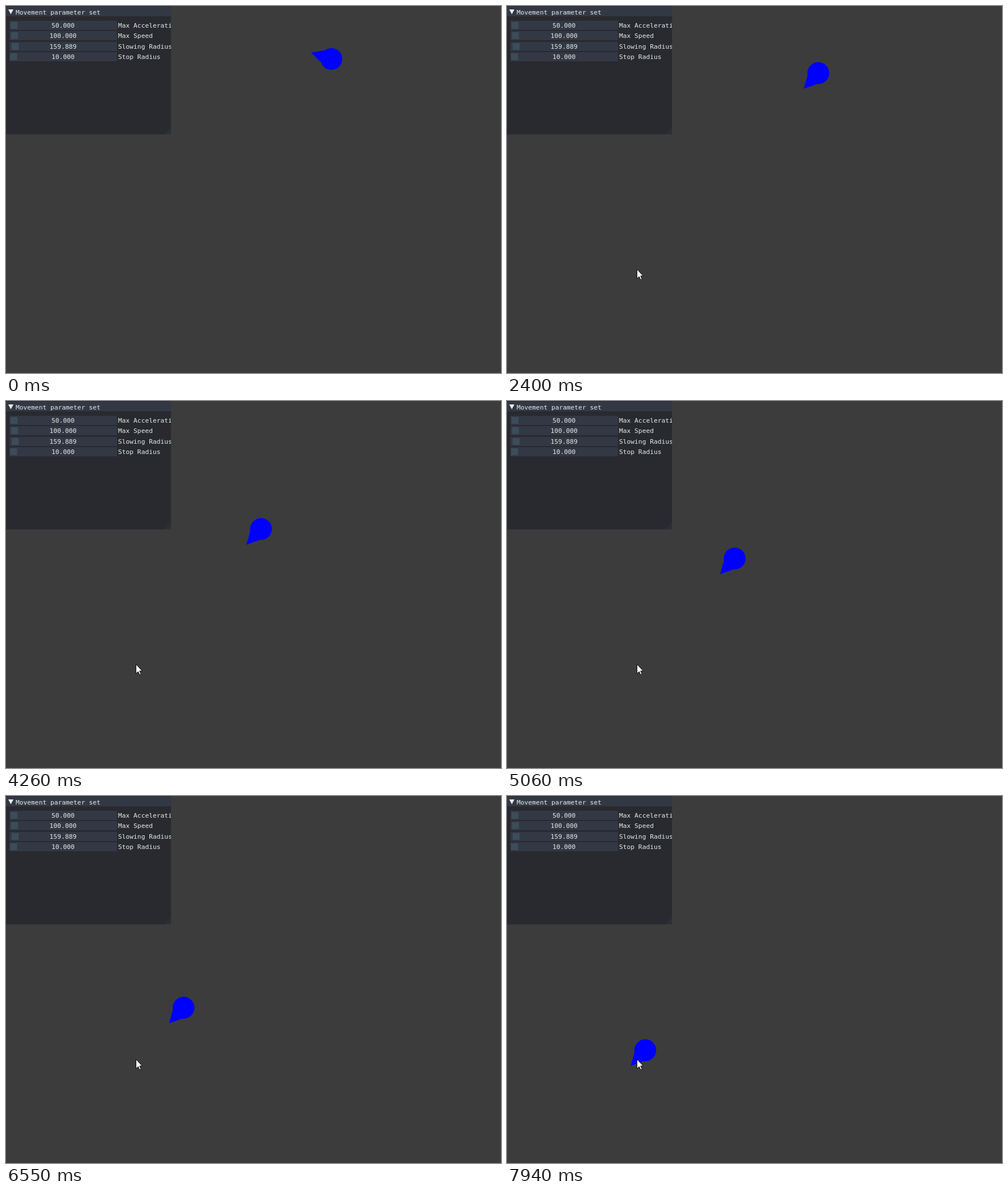
These frames come from a looping animation (870 by 644 pixels, 8 s). An HTML page:

```html
<!DOCTYPE html>
<html lang="en">
<head>
<meta charset="utf-8">
<title>Arrive steering</title>
<style>
  html, body { margin: 0; width: 100%; height: 100%; overflow: hidden; background: #3c3c3c; }
  svg { display: block; width: 870px; height: 644px; }
  text { font: 11.25px "DejaVu Sans Mono", monospace; fill: #e4eee8; white-space: pre; }
</style>
</head>
<body>
<svg viewBox="0 0 870 644">
  <defs><clipPath id="panelClip"><path d="M0 0H290V225.5H0Z"/></clipPath></defs>
  <g id="agent" fill="#00f">
    <circle r="19.2"/>
    <path d="M0 -19.2L37.6 0L0 19.2Z"/>
  </g>
  <g id="panel" clip-path="url(#panelClip)">
    <path d="M0 0H290V225.5H0Z" fill="#292a2f"/>
    <path d="M0 1H290V18H0Z" fill="#333845"/>
    <path d="M4 6H13L8.5 14.5Z" fill="#e4eee8"/>
    <text x="17" y="14.5">Movement parameter set</text>
    <path d="M290 213V225.5H277.5Z" fill="#78c4d4" fill-opacity=".04"/>
  </g>
  <path id="cursor" d="M0 0V16.3L3.8 12.8L6.4 18.4L8.8 17.3L6.3 11.8H11Z" fill="#fff" stroke="#000" stroke-width=".9"/>
</svg>
<script>
const LOOP = 8, FPS = 15;
const REST = { x: 571, y: 92 };
const COURSE = Math.atan2(354, -328);
const FIRST_HEADING = 197.4;
const DEPART = 1.02, SLOW = 6.96;
const CURSOR_IN = 0.45, CURSOR_REST = 1.1;

const agent = document.getElementById('agent');
const panel = document.getElementById('panel');
const cursor = document.getElementById('cursor');

const settings = {
  'Max Acceleration': 50,
  'Max Speed': 100,
  'Slowing Radius': 159.889,
  'Stop Radius': 10
};

const clamp = (v, low, high) => Math.min(high, Math.max(low, v));
const progress = (t, from, to) => clamp((t - from) / (to - from), 0, 1);

function add(name, attrs, content = '') {
  const node = document.createElementNS('http://www.w3.org/2000/svg', name);
  for (const key in attrs) node.setAttribute(key, attrs[key]);
  node.textContent = content;
  panel.append(node);
}

Object.entries(settings).forEach(([label, value], i) => {
  const y = Math.round(26 + i * 18.3);
  add('rect', { x: 6, y, width: 189, height: 16, fill: '#333845' });
  add('rect', { x: 7 + value * 0.018, y: y + 2, width: 12.3, height: 12, fill: '#3d4c59' });
  add('text', { x: 100.3, y: y + 12.2, 'text-anchor': 'middle' }, value.toFixed(3));
  add('text', { x: 197, y: y + 12.2 }, label);
});

// Distance covered by accelerating for a while, then coasting
function travel(t, acceleration, duration) {
  const pushing = clamp(t, 0, duration);
  return acceleration * pushing * (Math.max(t, 0) - pushing / 2);
}

function placeAgent(t) {
  const distance = travel(t - DEPART, 36.8, 2.4) - travel(t - SLOW, 46.5, LOOP);
  const settle = 1 - progress(t, 0, DEPART);
  const x = REST.x + settle + distance * Math.cos(COURSE);
  const y = REST.y + settle + distance * Math.sin(COURSE);
  const turn = progress(t, DEPART, DEPART + 0.2);
  const heading = FIRST_HEADING + (COURSE * 180 / Math.PI - FIRST_HEADING) * turn;
  agent.setAttribute('transform', `translate(${x} ${y}) rotate(${heading})`);
}

const bezier = (u, a, b, c, d) =>
  a * (1 - u) ** 3 + 3 * b * u * (1 - u) ** 2 + 3 * c * u * u * (1 - u) + d * u ** 3;

function placeCursor(t) {
  const u = progress(t, CURSOR_IN, CURSOR_REST);
  const x = bezier(u, 652, 600, 140, 228.5);
  const y = bezier(u, 380, 600, 440, 462);
  cursor.setAttribute('transform', `translate(${x} ${y})`);
  cursor.setAttribute('visibility', u > 0 ? 'visible' : 'hidden');
}

const start = performance.now();
function tick() {
  const seconds = (performance.now() - start) / 1000;
  // The small lead absorbs frame times rounded to 10 ms
  const t = Math.floor((seconds + 0.007) * FPS) / FPS % LOOP;
  placeAgent(t);
  placeCursor(t);
  requestAnimationFrame(tick);
}
tick();
</script>
</body>
</html>
```
